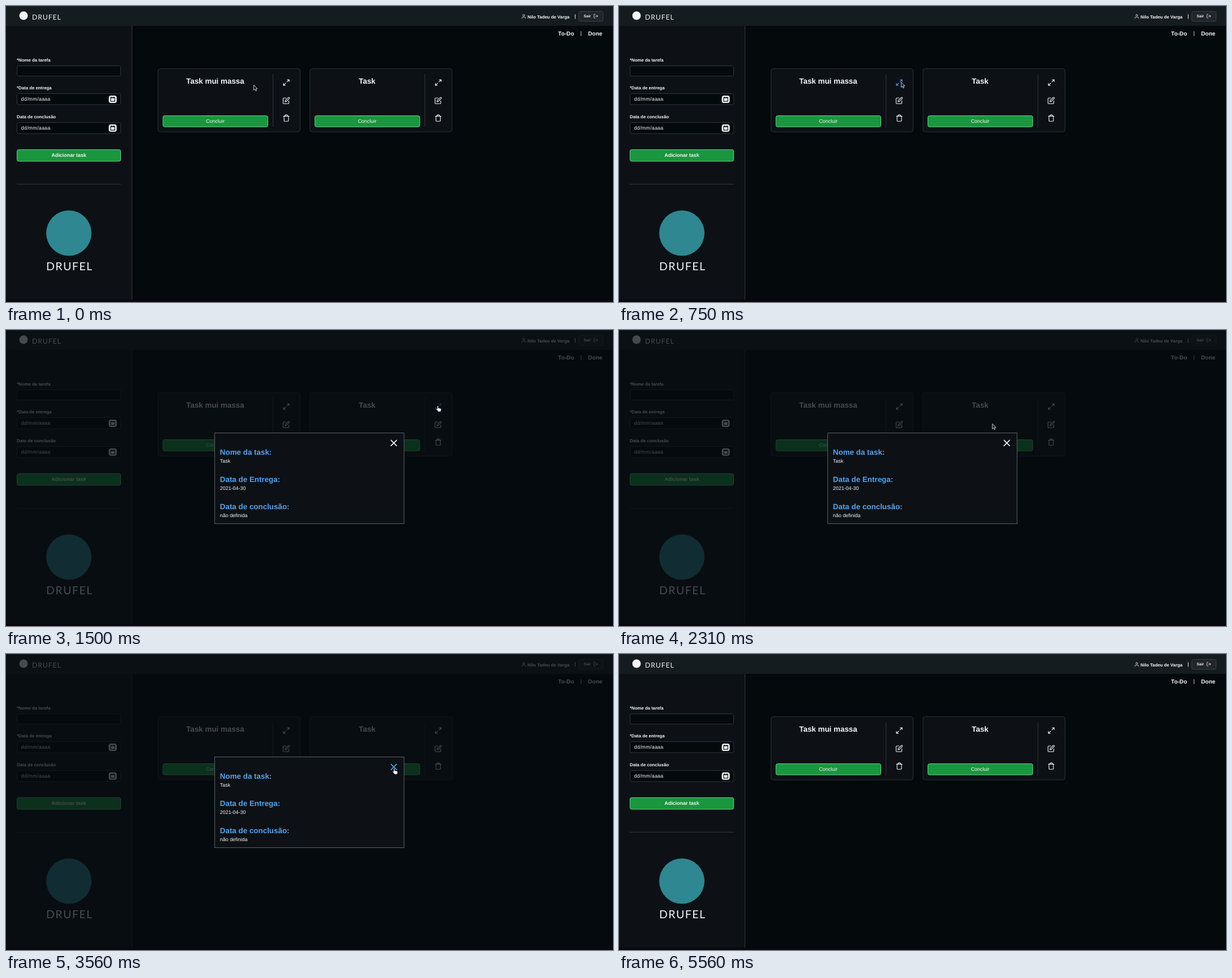
Animation of 1072 by 522 pixels, one loop 5870 ms. Source, as an HTML page:

```html
<!DOCTYPE html>
<html lang="pt-BR">
<head>
<meta charset="utf-8">
<title>Lista de tarefas</title>
<style>
  html, body { margin: 0; width: 100%; height: 100%; overflow: hidden; background: #04090c; }
  svg { display: block; width: 100%; height: 100%; }
  text { font: 8.93px "Liberation Sans", Arial, sans-serif; fill: #f4f6f8; text-rendering: geometricPrecision; }
  .small { font-size: 7.82px; font-weight: bold; }
  .tiny { font-size: 6.7px; font-weight: bold; }
  .nav { font-size: 10.05px; font-weight: bold; }
  .title { font-size: 13.4px; font-weight: bold; }
  .bold { font-weight: bold; }
  .mid { text-anchor: middle; }
  .blue { fill: #56a2ea; }
  .brand { font: 12.2px Lato, sans-serif; letter-spacing: .95px; }
  .big { font-size: 19.5px; letter-spacing: 1.5px; }
  .date { letter-spacing: .24px; }
  .field { fill: #04090c; stroke: #30363d; }
  .panel { fill: #0d1116; stroke: #2b3137; }
  .green { fill: #19963e; stroke: #6fce8b; }
  .rule { stroke: #30363d; }
  .icon { fill: none; stroke: #f4f6f8; stroke-width: 2; stroke-linecap: round; stroke-linejoin: round; }
  .icon.hover { stroke: #56a2ea; }
</style>
</head>
<body>
<svg viewBox="0 0 1072 522">
  <defs>
    <g id="calendar">
      <rect x="181.5" y="-6.5" width="14" height="13" rx="3.8" fill="#f4f6f8"/>
      <path d="M184.9-3.2h7.2v6.8h-7.2zM184.5-2.5h8M186.4-4.5v1M190.6-4.5v1" fill="none" stroke="#0b1013" stroke-width="1.2"/>
    </g>
    <g id="card">
      <rect class="panel" x=".5" y="110.5" width="251" height="111.5" rx="4"/>
      <path class="rule" d="M203.5 120V213"/>
      <rect class="green" x="9.2" y="193.5" width="185.3" height="19.6" rx="3"/>
      <text class="mid" x="101.5" y="206">Concluir</text>
      <g class="icon">
        <path transform="translate(220.3 160) scale(.558)" d="M11 4H4a2 2 0 0 0-2 2v14a2 2 0 0 0 2 2h14a2 2 0 0 0 2-2v-7M18.5 2.5a2.1 2.1 0 0 1 3 3L12 15l-4 1 1-4z"/>
        <path transform="translate(220.3 191) scale(.558)" d="M3 6h18M19 6v14a2 2 0 0 1-2 2H7a2 2 0 0 1-2-2V6m3 0V4a2 2 0 0 1 2-2h4a2 2 0 0 1 2 2v2"/>
      </g>
    </g>
    <path id="expand" transform="scale(.558)" d="M15 3h6v6M9 21H3v-6M21 3l-7 7M3 21l7-7"/>
  </defs>

  <rect width="1072" height="522" fill="#04090c"/>
  <rect y="35" width="222" height="483" fill="#0d1116"/>
  <path class="rule" d="M222.5 35V518"/>
  <rect width="1072" height="35" fill="#151c1f"/>

  <circle cx="31" cy="17" r="7.5" fill="#f4f6f8"/>
  <text class="brand" x="46" y="24">DRUFEL</text>
  <g class="icon" transform="translate(909.6 13.7) scale(.39)">
    <path d="M20 21v-2a4 4 0 0 0-4-4H8a4 4 0 0 0-4 4v2"/><circle cx="12" cy="7" r="4"/>
  </g>
  <text class="small" x="921" y="22">Nilo Tadeu de Varga</text>
  <path d="M1005.2 14.5V22.5" stroke="#f4f6f8"/>
  <rect x="1011.5" y="9.5" width="43" height="17.5" rx="3" fill="#21262b" stroke="#3a4046"/>
  <text class="tiny" x="1020.3" y="20">Sair</text>
  <path class="icon" transform="translate(1037.2 13.4) scale(.37)" d="M9 21H5a2 2 0 0 1-2-2V5a2 2 0 0 1 2-2h4M16 17l5-5-5-5M21 12H9"/>

  <text class="nav" x="975" y="52">To-Do</text>
  <path d="M1015.5 44.5V53" stroke="#b9bdc0"/>
  <text class="nav" x="1028" y="52">Done</text>

  <text class="small" x="19" y="98">*Nome da tarefa</text>
  <rect class="field" x="19.5" y="105.5" width="183" height="18" rx="3"/>
  <text class="small" x="19" y="147">*Data de entrega</text>
  <rect class="field" x="19.5" y="154.5" width="183" height="19.5" rx="3"/>
  <text class="date" x="26.5" y="167">dd/mm/aaaa</text>
  <use href="#calendar" y="164.5"/>
  <text class="small" x="19" y="198">Data de conclusão</text>
  <rect class="field" x="19.5" y="205.5" width="183" height="19.5" rx="3"/>
  <text class="date" x="26.5" y="218">dd/mm/aaaa</text>
  <use href="#calendar" y="215.3"/>
  <rect class="green" x="19.5" y="253.3" width="183" height="20.5" rx="3"/>
  <text class="bold mid" x="111" y="266">Adicionar task</text>
  <path class="rule" d="M19 314.3H203"/>
  <circle cx="111" cy="400.5" r="40" fill="#2f8791"/>
  <text class="brand big" x="71" y="466">DRUFEL</text>

  <use href="#card" x="268"/>
  <text class="title mid" x="369.5" y="137">Task mui massa</text>
  <use href="#expand" class="icon" id="expandFirst" x="488.3" y="128.3"/>
  <use href="#card" x="536.3"/>
  <text class="title mid" x="637.8" y="137">Task</text>
  <use href="#expand" class="icon" id="expandSecond" x="756.7" y="128.3"/>

  <g id="modal">
    <rect width="1072" height="522" fill="#060c10" opacity=".73"/>
    <rect x="368.5" y="181.5" width="334.5" height="160" fill="#0d1116" stroke="#5b6065"/>
    <path class="icon" id="close" transform="translate(675.2 189.5) scale(.81)" d="M18 6L6 18M6 6l12 12"/>
    <text class="title blue" x="377.8" y="220">Nome da task:</text>
    <text x="377.8" y="234">Task</text>
    <text class="title blue" x="377.8" y="268">Data de Entrega:</text>
    <text x="377.8" y="282">2021-04-30</text>
    <text class="title blue" x="377.8" y="316">Data de conclusão:</text>
    <text x="377.8" y="330">não definida</text>
  </g>

  <path d="M0 .3H1072" stroke="#1f2b2e" stroke-width=".7"/>
  <rect y="518.5" width="1072" height="3.5" fill="#0b070d"/>

  <g id="cursor">
    <path id="arrow" d="M.3.3V9.4L2.4 7.5 4 10.8 5.4 10.1 3.9 7H6.7z" fill="#0b1013" stroke="#f4f6f8" stroke-width=".8"/>
    <path id="hand" d="M-.9 1c0-1.1 1.8-1.1 1.8 0v3.1l3.9.8q1.3.3 1.2 1.5l-.6 2.4v1.6h-5.4v-1.2l-2.8-3q0-1.2 1-1l.9.7z" fill="#fff" stroke="#05080a" stroke-width=".5"/>
  </g>
</svg>
<script>
const LOOP = 5870, STEP = 62.5;

// Pointer path: [step, x, y]
const path = [
  [1, 437.2, 139], [3, 441, 141], [5, 462, 143], [7, 486, 141], [9, 497, 136], [10, 498, 134],
  [13, 498, 134], [15, 540, 139], [17, 640, 144], [19, 738, 140], [20, 760, 135], [21, 762.6, 133.5],
  [30, 762.6, 133.5], [31, 725.4, 141], [33, 725.4, 141], [36, 672, 160], [37, 659, 165], [39, 638, 174],
  [41, 638, 174], [42, 600, 188], [43, 541, 208], [45, 575, 225], [47, 625, 227],
  [49, 625, 227], [52, 640, 221], [55, 676, 207], [57, 685.6, 201.7],
  [80, 685.6, 201.7], [82, 690, 225], [85, 688, 360], [89, 680, 530]
];

const $ = id => document.getElementById(id);
const show = (id, on) => $(id).setAttribute('visibility', on ? 'visible' : 'hidden');
const within = (v, from, to) => v >= from && v < to;

function pointerAt(step) {
  const next = path.findIndex(p => p[0] > step);
  if (next < 1) return path[next ? path.length - 1 : 0].slice(1);
  const [s0, x0, y0] = path[next - 1], [s1, x1, y1] = path[next];
  const k = (step - s0) / (s1 - s0);
  return [x0 + (x1 - x0) * k, y0 + (y1 - y0) * k];
}

function draw(now) {
  const step = Math.floor((now % LOOP + 3) / STEP);
  const hand = within(step, 9, 12) || within(step, 20, 26) || within(step, 56, 82);
  $('cursor').setAttribute('transform', `translate(${pointerAt(step)})`);
  show('arrow', !hand);
  show('hand', hand);
  show('modal', within(step, 24, 80));
  $('expandFirst').classList.toggle('hover', within(step, 9, 14));
  $('expandSecond').classList.toggle('hover', within(step, 20, 26));
  $('close').classList.toggle('hover', step >= 56);
}

function frame() {
  draw(performance.now());
  requestAnimationFrame(frame);
}
frame();
</script>
</body>
</html>
```
